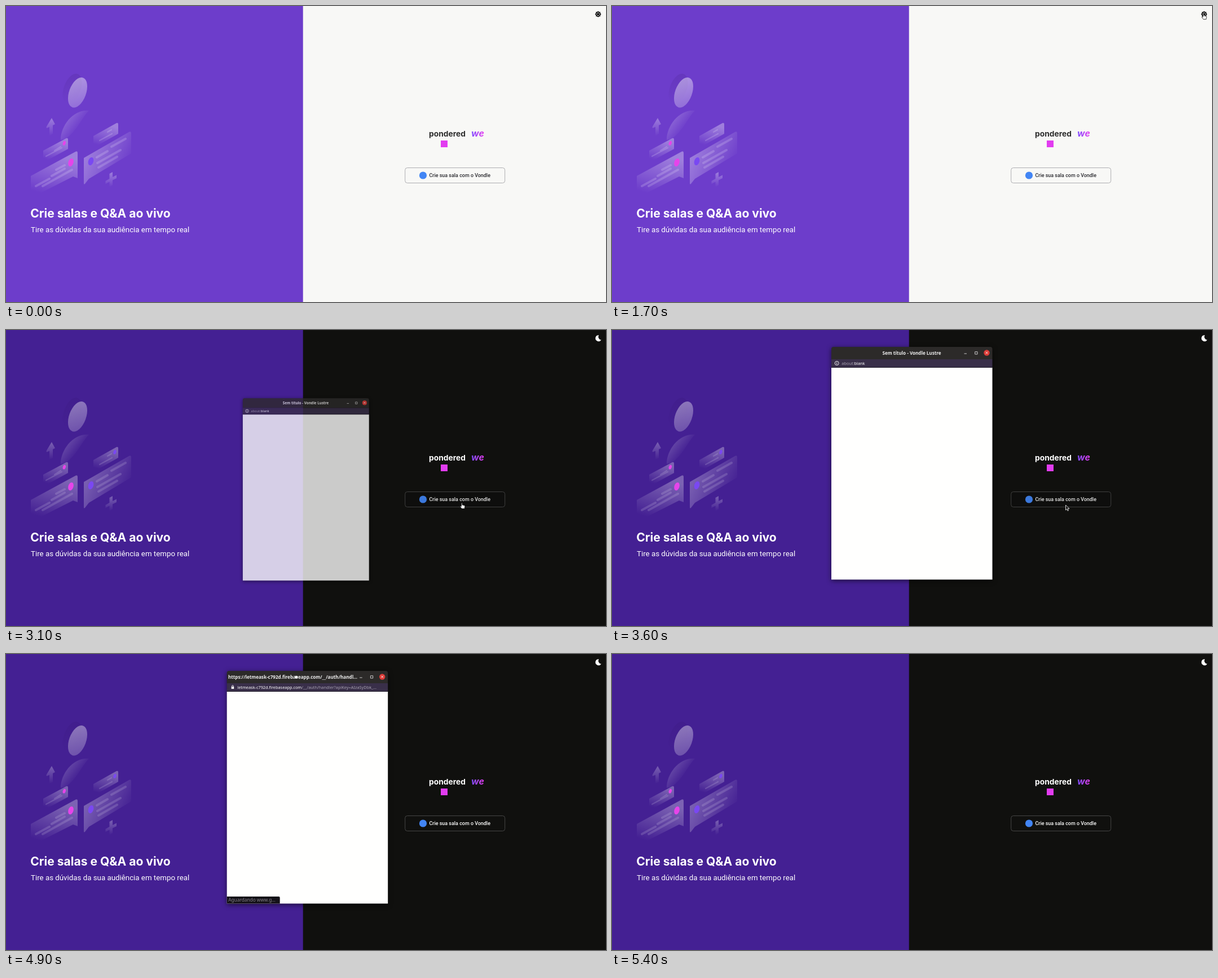
An HTML page for the animation above (8 s loop, 1064 by 526 pixels).

```html
<!DOCTYPE html>
<html lang="pt-BR">
<head>
<meta charset="utf-8">
<title>Salas de perguntas</title>
<style>
html, body { margin: 0; width: 100%; height: 100%; overflow: hidden }
svg {
  display: block; width: 100%; height: 100%;
  --side: #6d3dcb; --page: #f8f8f6; --ink: #29292e; --icon: #000; --line: #a5a5aa; --art: 1;
}
svg.dark { --side: #442093; --page: #10100e; --ink: #fff; --icon: #fff; --line: #4c4c4c; --art: .88 }
text { font-family: Roboto, sans-serif; white-space: pre }
.brand, .heading { font-family: Inter, sans-serif; font-weight: 700 }
.win text { font-family: "Noto Sans", sans-serif; font-size: 7.35px; fill: #fff }
.win .title { font-size: 8.1px; font-weight: 700; fill: #eee }
.win .dim { fill: #a9a3b2 }
#win { filter: drop-shadow(0 2px 4px #0009) }
.art { opacity: var(--art) }
.bars { fill: none; stroke: #fff; stroke-opacity: .17; stroke-linecap: round }
</style>
</head>
<body>
<svg id="stage" viewBox="0 0 1064 526">
  <defs>
    <linearGradient id="fade" x1="0" y1="0" x2="0" y2="1">
      <stop offset=".1" stop-color="#fff" stop-opacity=".3"/>
      <stop offset="1" stop-color="#fff" stop-opacity="0"/>
    </linearGradient>
    <linearGradient id="cardL" x1=".65" y1=".1" x2=".4" y2=".95">
      <stop offset="0" stop-color="#fff" stop-opacity=".34"/>
      <stop offset="1" stop-color="#fff" stop-opacity="0"/>
    </linearGradient>
    <linearGradient id="cardR" x1=".1" y1=".4" x2=".85" y2=".8">
      <stop offset="0" stop-color="#fff" stop-opacity=".32"/>
      <stop offset="1" stop-color="#fff" stop-opacity="0"/>
    </linearGradient>
    <linearGradient id="face" x1=".2" y1="0" x2=".6" y2="1">
      <stop offset="0" stop-color="#fff" stop-opacity=".46"/>
      <stop offset="1" stop-color="#fff" stop-opacity=".26"/>
    </linearGradient>
    <linearGradient id="torso" x1=".1" y1=".2" x2=".62" y2=".62">
      <stop offset="0" stop-color="#fff" stop-opacity=".26"/>
      <stop offset="1" stop-color="#fff" stop-opacity="0"/>
    </linearGradient>
    <linearGradient id="shade" x1=".2" y1="0" x2=".5" y2="1">
      <stop offset="0" stop-color="#301060" stop-opacity=".14"/>
      <stop offset="1" stop-color="#301060" stop-opacity="0"/>
    </linearGradient>
    <linearGradient id="pink">
      <stop offset="0" stop-color="#7c4dff"/>
      <stop offset="1" stop-color="#e83cf0"/>
    </linearGradient>
  </defs>

  <rect width="1064" height="526" fill="var(--page)"/>
  <rect width="526.700" height="526" fill="var(--side)"/>

  <!-- illustration -->
  <g class="art">
    <ellipse cx="117.500" cy="147" rx="15" ry="28" transform="rotate(20 117.500 147)" fill="url(#shade)"/>
    <ellipse cx="127" cy="153.700" rx="15" ry="28" transform="rotate(20 127 153.700)" fill="url(#face)"/>
    <path d="M97 238C97 212 120 183 147 186C132 202 128 220 106 236Z" fill="url(#torso)"/>
    <path d="M81 199L87 210L83 212V227L77 231V215L72 217Q71 216 72 214Z" fill="url(#fade)"/>
    <path d="M183.500 298L189 295V304L196 300.500V306L189 309.500V318L183.500 322V312.500L176.500 316V311L183.500 307Z" fill="url(#fade)"/>
    <path d="M66 257L107 235Q110 234 110 237V254L66 278Z" fill="url(#cardL)"/>
    <path d="M155 231L196 208Q199 207 199 210V227L155 252Z" fill="url(#cardL)"/>
    <path d="M44 302L123 259Q127 257 127 261V306L119 303L44 341Z" fill="url(#cardL)"/>
    <path d="M138 270L218 224Q222 222 222 226V262L147 307L140 316Q138 318 138 315Z" fill="url(#cardR)"/>
    <path class="bars" stroke-width="4" d="M89 291L104 283M81 302L104 289M53 320L77 307M65 320L117 291M187 250L212 236M161 269L180 258M162 279L203 256M164 287L197 268"/>
    <path class="bars" stroke-width="2.200" d="M86 257L97 250M71 267L99 252M180 224L187 220M166 239L188 227"/>
  </g>
  <g fill="#e644ea">
    <ellipse cx="103.300" cy="243.800" rx="2.500" ry="4" transform="rotate(18 103.300 243.800)"/>
    <ellipse cx="115" cy="278" rx="4.500" ry="7.300" transform="rotate(18 115 278)"/>
  </g>
  <ellipse cx="150.500" cy="276" rx="4.500" ry="7.300" transform="rotate(18 150.500 276)" fill="#7a48f2"/>
  <ellipse id="dot" cx="193" cy="217" rx="2.500" ry="4" transform="rotate(18 193 217)" fill="#7a48f2"/>

  <text class="heading" x="43.300" y="375.500" font-size="21.050" fill="#fff">Crie salas e Q&amp;A ao vivo</text>
  <text x="44" y="402.300" font-size="13.300" fill="#fff">Tire as dúvidas da sua audiência em tempo real</text>

  <!-- brand and button -->
  <rect x="771" y="239" width="12" height="12" fill="#e23cf0"/>
  <text id="word" class="brand" x="750" y="231.500" font-size="13.800">pondered</text>
  <text class="brand" x="825" y="231.500" font-size="16" font-style="italic" fill="url(#pink)">we</text>
  <g id="button">
    <rect x="707.700" y="287.500" width="177" height="27" rx="4" fill="var(--page)" stroke="var(--line)" stroke-width=".9"/>
    <circle cx="739.500" cy="301" r="6.600" fill="#4285f4"/>
    <text x="750.500" y="304.200" font-size="8.930" font-weight="500" fill="var(--ink)">Crie sua sala com o Vondle</text>
  </g>

  <!-- theme switch -->
  <g id="sun" transform="translate(1050 14.500)">
    <path d="M-3.900-3.900H3.900V3.900H-3.900Z"/>
    <path d="M-3.900-3.900H3.900V3.900H-3.900Z" transform="rotate(45)"/>
    <circle r="2.600" fill="none" stroke="var(--page)" stroke-width=".9"/>
  </g>
  <path id="moon" d="M1051.300 9.200A5.500 5.500 0 1 0 1055.500 17.500A5.300 5.300 0 0 1 1051.300 9.200Z" fill="#fff"/>

  <g id="win" class="win">
    <path d="M389 52V34Q389 30 393 30H670.500Q674.500 30 674.500 34V52Z" fill="#2c2a29"/>
    <path d="M389 52H674.500V67H389Z" fill="#392f49"/>
    <path d="M389 66.500H674.500" stroke="#1d1826"/>
    <path d="M389 67H674.500V443.500H389Z" fill="#fffffe"/>
    <path d="M624.500 42H629M643.700 38.700H648V43H643.700Z" fill="none" stroke="#ddd" stroke-width=".9"/>
    <circle cx="664.500" cy="40.500" r="5.200" fill="#dc3b37"/>
    <path d="M662.700 38.700L666.300 42.300M666.300 38.700L662.700 42.300" stroke="#fff" stroke-width=".9"/>
    <g id="blank">
      <text class="title" x="531.500" y="43.700" text-anchor="middle">Sem título - Vondle Lustre</text>
      <circle cx="398.700" cy="59" r="3.500" fill="none" stroke="#fff" stroke-width=".9"/>
      <path d="M398.700 58.500V61M398.700 56.700V57.600" stroke="#fff"/>
      <text x="407.300" y="61.500"><tspan class="dim">about:</tspan>blank</text>
    </g>
    <g id="auth">
      <text class="title" x="391.300" y="43.700">https://letmeask-c792d.firebaseapp.com/__/auth/handl…</text>
      <path d="M397 58H401.500V62H397Z" fill="#fff"/>
      <path d="M397.900 58V57A1.350 1.350 0 0 1 400.600 57V58" fill="none" stroke="#fff" stroke-width=".8"/>
      <text x="407.600" y="61.500">letmeask-c792d.firebaseapp.com<tspan class="dim">/__/auth/handler?apiKey=AIzaSyDbk_…</tspan></text>
    </g>
    <g id="status">
      <path d="M389 443.500V431H481Q483 431 483 433V443.500Z" fill="#141118"/>
      <text x="391.500" y="440" style="font-size:8.300px;fill:#85828a">Aguardando www.g…</text>
    </g>
  </g>

  <g id="cursor" stroke-linejoin="round">
    <path id="arrow" d="M.5.5V9.500L2.600 7.600L4 10.800L5.500 10.200L4.100 7H7Z" fill="#151515" stroke="#fff" stroke-width=".8"/>
    <path id="hand" d="M2.500 1Q3.800 0 4 1.500V4.300L7.700 5.200Q9 5.600 8.800 7L8.100 11H3.400L.7 7.700Q.3 6.400 1.600 6.500L2.500 7.100Z" fill="#fff" stroke="#111" stroke-width=".8"/>
    <path id="fist" d="M1 2.500Q2 .6 3.300 1.300Q4.500.2 5.500 1.300Q7.200 1.200 7.300 3L6.500 6.500H2L.5 4.200Z" fill="#fff" stroke="#111" stroke-width=".6"/>
  </g>
</svg>
<script>
const LOOP = 8000, STEP = 100;
const el = id => document.getElementById(id);
const show = (id, on) => el(id).style.display = on ? "" : "none";
const clamp = v => Math.max(0, Math.min(1, v));
const within = (t, a, b) => t >= a && t < b;

// pointer path: time, x, y
const path = [
  [200, 92, 15], [400, 811, 258], [500, 811, 258], [700, 566, 275], [900, 800, 302],
  [1000, 800, 302], [1400, 1014, 55], [1500, 1014, 55], [1700, 1045.5, 12.7],
  [1900, 1045.5, 10.7], [2700, 806, 303], [2800, 805, 306.5], [3200, 805, 306.5],
  [3300, 804, 310.5], [3600, 804, 310.5], [4100, 508, 37.5], [4700, 508, 37.5]
];

function pointer(t) {
  const i = path.findIndex(p => p[0] > t);
  if (i < 1) return path[i ? path.length - 1 : 0].slice(1);
  const [a, b] = [path[i - 1], path[i]];
  const u = (t - a[0]) / (b[0] - a[0]);
  return [1, 2].map(k => a[k] + (b[k] - a[k]) * u);
}

function drag(t) {
  if (t < 4900) return [0, 0];
  const u = (t - 4900) / 500;
  return [2.7 + 680 * u ** 1.5, 40 * u];
}

function draw(t) {
  const dark = t >= 1900;
  el("stage").classList.toggle("dark", dark);
  show("sun", !dark);
  show("moon", dark);
  show("dot", dark);
  const ink = dark ? 51 + 204 * clamp((t - 1900) / 300) : 45;
  el("word").setAttribute("fill", `rgb(${ink},${ink},${ink})`);

  const hover = within(t, 800, 1100) || within(t, 2600, 3700);
  el("button").style.filter = hover ? "brightness(.9)" : "";

  // popup grows from its lower edge, then is dragged away
  const open = 1 - (1 - clamp((t - 2960) / 350)) ** 3;
  const [dx, dy] = drag(t);
  show("win", within(t, 3000, 5400));
  el("win").setAttribute("transform",
    `translate(${532 + dx} ${452 + dy}) scale(${open}) translate(-532 -452)`);
  el("win").style.opacity = open;
  show("blank", t < 4300);
  show("auth", t >= 4300);
  show("status", t >= 4500);

  const [x, y] = pointer(t);
  const hand = within(t, 800, 1100) || within(t, 1700, 2000) || within(t, 2600, 3300);
  const fist = t >= 4900;
  show("cursor", within(t, 200, 5400));
  el("cursor").setAttribute("transform", `translate(${x + dx} ${y + dy})`);
  show("hand", hand);
  show("fist", fist);
  show("arrow", !hand && !fist);
}

const start = performance.now();
function tick() {
  const t = (performance.now() - start) % LOOP;
  draw(Math.floor(t / STEP) * STEP);
  requestAnimationFrame(tick);
}
tick();
</script>
</body>
</html>
```
